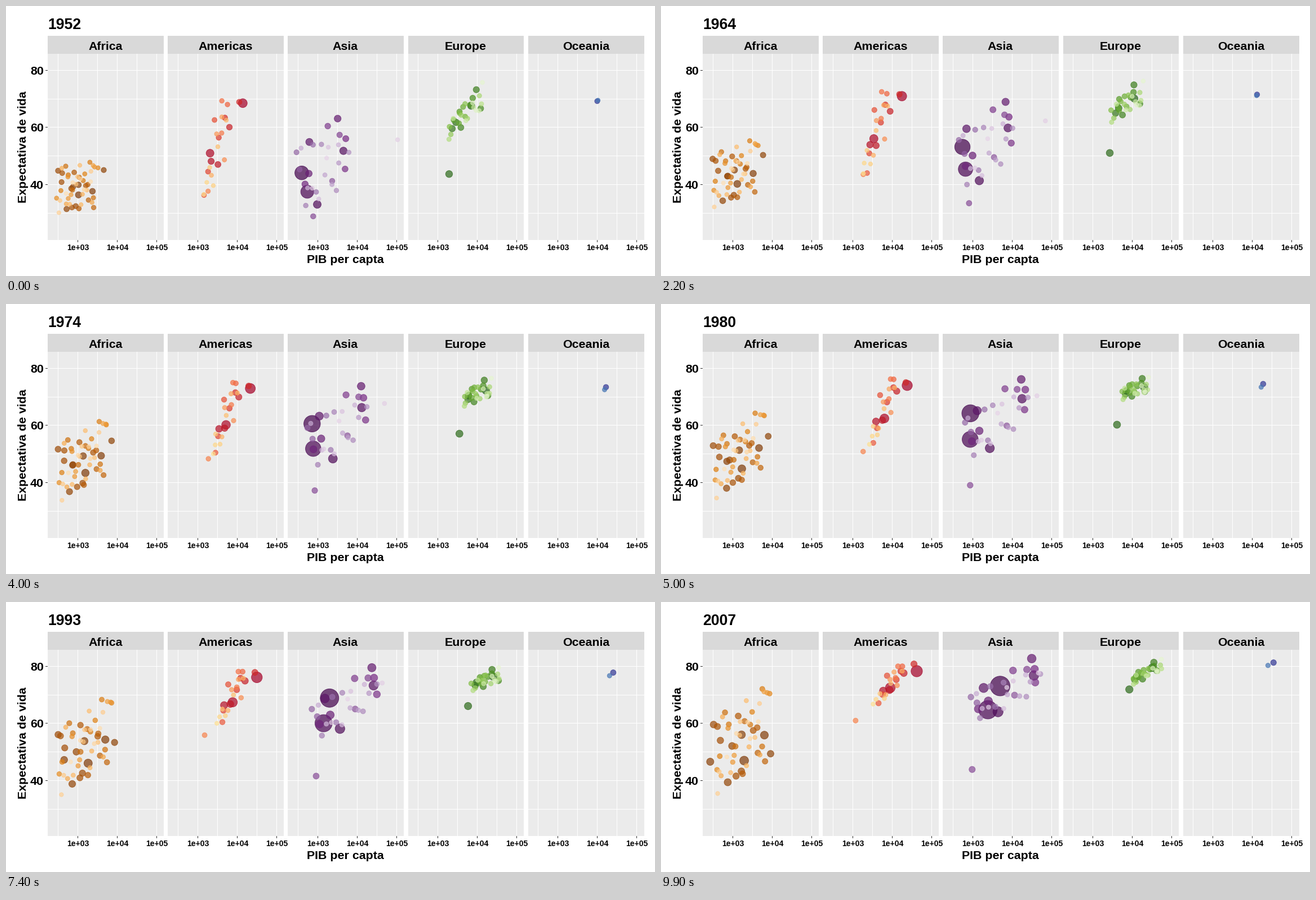
Write a matplotlib script that moves like this. It is 1152 px wide and 480 px high and loops after 10 s.

```python
import numpy as np
import matplotlib.pyplot as plt
from matplotlib.animation import FuncAnimation
from matplotlib.colors import LinearSegmentedColormap
from matplotlib.patches import Rectangle

W, H, DPI = 1152, 480, 96
FRAMES, INTERVAL = 100, 100
FIRST, LAST = 1952, 2007
KEYS = (1952, 1980, 2007)
SURVEYS = np.arange(FIRST, LAST + 1, 5)
STRIP, TOP, BOTTOM = 53, 85, 416
MAX_POP = 1319

rng = np.random.default_rng(7)
plt.rcParams["font.family"] = "Liberation Sans"
fig = plt.figure(figsize=(W / DPI, H / DPI), dpi=DPI, facecolor="white")
ax = fig.add_axes([0, 0, 1, 1])
ax.set(xlim=(0, W), ylim=(H, 0))
ax.axis("off")


def box(x, y, w, h, color):
    ax.add_patch(Rectangle((x, y), w, h, fc=color, lw=0, antialiased=False))


def label(x, y, text, px, ha="center", **kw):
    return ax.text(x, y, text, size=px * 72 / DPI, weight="bold",
                   ha=ha, va="baseline", color="black", **kw)


def y_of(life):
    return 317 - (life - 40) * 5.08


def nearest(v):
    return int(v + 0.5)


def path(start, middle, end):
    """Values at every survey year from values at the three key years."""
    return np.interp(SURVEYS, KEYS, (start, middle, end))


class Panel:
    def __init__(self, index, title, ramp, count, top_pop, decay, growth):
        self.left = 73.95 + 213.2 * index
        self.title = title
        rank = np.arange(count)
        self.pop = top_pop * np.exp(-decay * rank)
        self.growth = growth
        self.log_gdp = np.zeros((len(SURVEYS), count))
        self.life = np.zeros_like(self.log_gdp)
        cmap = LinearSegmentedColormap.from_list(title, ramp.split())
        self.colors = cmap(np.linspace(0, 1, count))

    def x_of(self, log_gdp):
        return self.left + (log_gdp - 2.2484) * 70.03

    def cloud(self, *shapes):
        """Scatter all dots; each shape is (gdp, gdp sd, life, life sd, correlation)."""
        count = len(self.pop)
        a, b = (1.75 * rng.permutation(np.linspace(-1, 1, count)) for _ in range(2))
        gx, sx, ly, sy, rho = (path(*column)[:, None] for column in zip(*shapes))
        wobble = rng.normal(0, 0.03, self.log_gdp.shape)
        self.log_gdp = gx + sx * a + wobble
        self.life = ly + sy * (rho * a + np.sqrt(1 - rho ** 2) * b)

    def pin(self, rank, pop, start, middle, end):
        """Lead one dot through its own (gdp, life) key points."""
        self.pop[rank] = pop
        self.log_gdp[:, rank], self.life[:, rank] = (
            path(*values) for values in zip(start, middle, end))

    def draw(self):
        x0, x1 = nearest(self.left), nearest(self.left + 205.8)
        box(x0, STRIP, x1 - x0, TOP - STRIP, "#D9D9D9")
        box(x0, TOP, x1 - x0, BOTTOM - TOP, "#EBEBEB")
        for life in range(30, 90, 10):
            box(x0, nearest(y_of(life)), x1 - x0, 1, "white")
        for half in range(5, 11):
            x = nearest(self.x_of(half / 2))
            box(x, TOP, 1, BOTTOM - TOP, "white")
            if half % 2 == 0:
                box(x, BOTTOM, 1, 4, "#333333")
                label(x + 0.5, 434, f"1e+0{half // 2}", 14)
        label((x0 + x1 - 1) / 2, 78, self.title, 21.33)


africa = Panel(0, "Africa", "#7F3B08 #B35806 #E08214 #FDB863 #FEE0B6", 52, 100, 0.1, 0.25)
africa.cloud((3.0, 0.29, 39, 4.7, 0.1), (3.17, 0.36, 50.5, 6.8, 0.5), (3.24, 0.4, 54.5, 8.5, 0.4))
africa.pin(0, 135, (3.03, 36.3), (3.25, 45.1), (3.30, 46.9))
africa.pin(3, 65, (2.89, 39.1), (2.88, 47.8), (2.44, 46.5))
africa.pin(4, 44, (3.67, 45), (3.92, 57), (3.97, 49.3))

americas = Panel(1, "Americas", "#A50026 #D73027 #F46D43 #FDAE61 #FEE090", 25, 110, 0.2, 0.45)
americas.cloud((3.46, 0.2, 53, 8, 0.5), (3.76, 0.2, 65.5, 5.5, 0.7), (3.93, 0.22, 73.6, 3.2, 0.7))
americas.pin(0, 301, (4.15, 68.4), (4.39, 74), (4.63, 78.2))
americas.pin(1, 190, (3.32, 50.9), (3.83, 62.5), (3.96, 72.4))
americas.pin(5, 33, (4.06, 68.8), (4.36, 75), (4.56, 80.7))
americas.pin(14, 8.5, (3.27, 37.6), (3.28, 51), (3.08, 60.9))

asia = Panel(2, "Asia", "#40004B #762A83 #9970AB #C2A5CF #E7D4E8", 33, 300, 0.17, 0.4)
asia.cloud((3.13, 0.36, 46.5, 7.8, 0.4), (3.6, 0.46, 62.5, 6.8, 0.7), (3.82, 0.5, 71, 5, 0.75))
asia.pin(0, 1319, (2.60, 44), (2.93, 64.8), (3.70, 73))
asia.pin(1, 1110, (2.74, 37.4), (2.93, 55.5), (3.39, 64.7))
asia.pin(5, 127, (3.51, 63), (4.26, 76.4), (4.50, 82.6))
asia.pin(12, 32, (2.89, 28.8), (2.94, 39.3), (2.99, 43.8))
asia.pin(31, 2.5, (5.03, 55.6), (4.61, 70.7), (4.67, 77.6))

europe = Panel(3, "Europe", "#276419 #4D9221 #7FBC41 #B8E186 #E6F5D0", 30, 75, 0.14, 0.75)
europe.cloud((3.7, 0.25, 65, 4.8, 0.85), (4.1, 0.18, 72.7, 1.8, 0.6), (4.37, 0.21, 77.7, 2.1, 0.85))
europe.pin(0, 82, (3.85, 67.5), (4.32, 73.3), (4.51, 79.4))
europe.pin(1, 71, (3.29, 43.6), (3.62, 60.5), (3.93, 71.8))

oceania = Panel(4, "Oceania", "#313695 #4575B4", 2, 20, 1.6, 0.45)
oceania.pin(0, 20, (4.00, 69.1), (4.28, 74.4), (4.54, 81.2))
oceania.pin(1, 4, (4.02, 69.4), (4.23, 73.2), (4.40, 80.2))

panels = [africa, americas, asia, europe, oceania]
for panel in panels:
    panel.draw()
for life in (40, 60, 80):
    y = nearest(y_of(life))
    box(70, y, 4, 1, "#333333")
    label(67, y + 8.3, str(life), 21.33, ha="right")
label(602.5, 457.3, "PIB per capta", 21.33)
label(36, 251, "Expectativa de vida", 21.33, rotation=90, rotation_mode="anchor")
title = label(74, 41, "", 26.67, ha="left")

xs = np.hstack([p.x_of(p.log_gdp) for p in panels])
ys = np.hstack([y_of(p.life) for p in panels])
last_pop = np.hstack([p.pop for p in panels])
first_pop = np.hstack([p.pop * p.growth for p in panels])
colors = np.vstack([p.colors for p in panels])
colors[:, 3] = 0.7
dots = ax.scatter(xs[0], ys[0], facecolors=colors, edgecolors=colors,
                  linewidths=0.71, zorder=3)


def update(frame):
    u = frame / (FRAMES - 1)
    # Dots move at a steady pace from one survey to the next.
    step = u * (len(SURVEYS) - 1)
    i = min(int(step), len(SURVEYS) - 2)
    f = step - i
    x, y = (v[i] + (v[i + 1] - v[i]) * f for v in (xs, ys))
    # Dot area follows population, between sizes 2 and 12.
    pop = first_pop + (last_pop - first_pop) * u
    diameter = 2.845 * (2 + 10 * np.sqrt(pop / MAX_POP)) + 0.945
    dots.set_offsets(np.column_stack([x, y]))
    dots.set_sizes((diameter * 72 / DPI) ** 2)
    title.set_text(str(round(FIRST + (LAST - FIRST) * u)))
    return dots, title


anim = FuncAnimation(fig, update, frames=FRAMES, interval=INTERVAL,
                     repeat=True, repeat_delay=0, blit=False)
plt.show()
```
